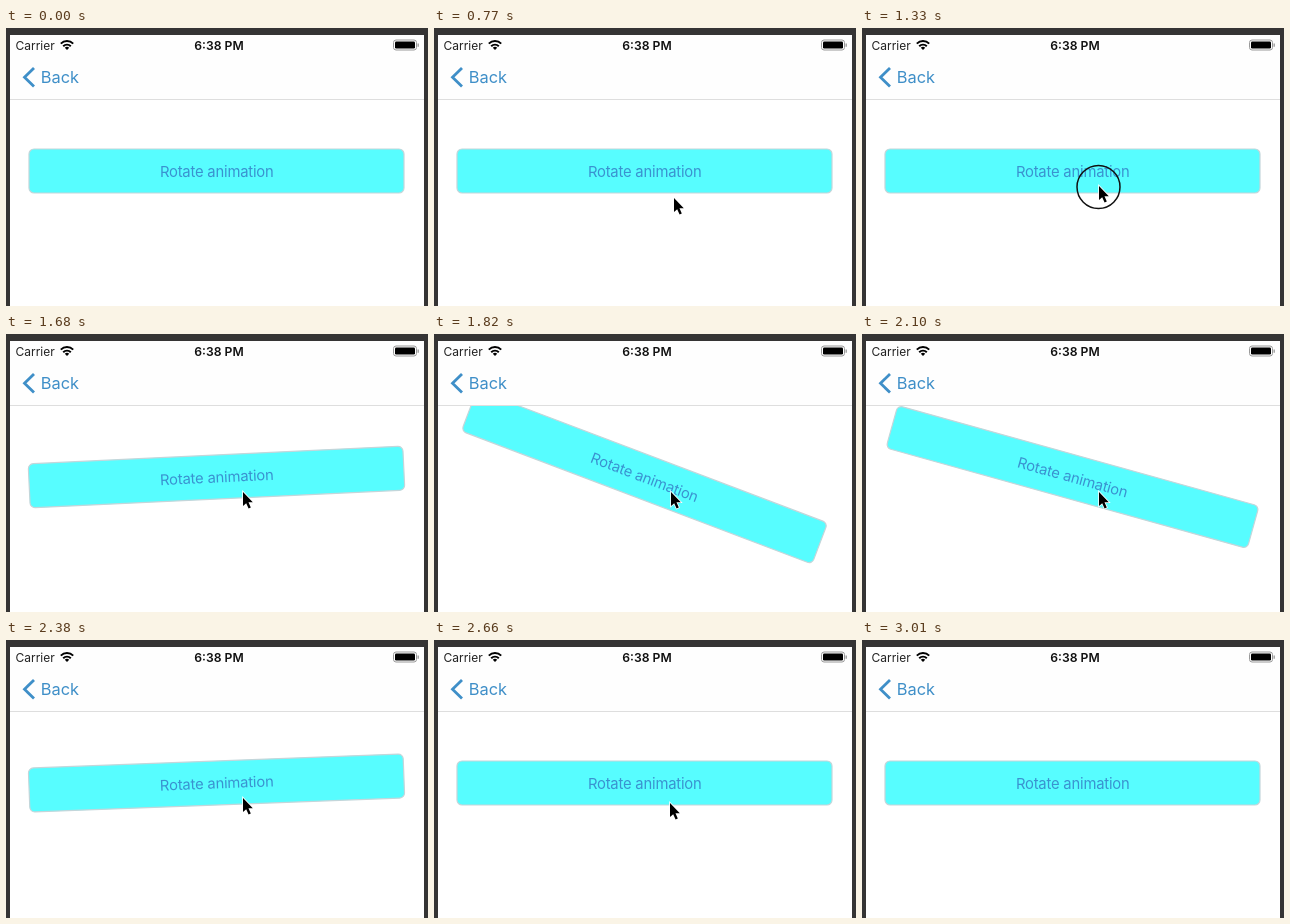
Write an HTML page that moves like this. It is 422 px wide and 278 px high and loops after 3080 ms.

```html
<!DOCTYPE html>
<html lang="en">
<head>
<meta charset="utf-8">
<title>Rotate animation</title>
<style>
  html, body { margin: 0; width: 100%; height: 100%; overflow: hidden; background: #333; }
  svg { display: block; width: 422px; height: 278px; font-family: Inter, Roboto, sans-serif; }
</style>
</head>
<body>
<svg viewBox="0 0 422 278">
  <rect width="422" height="278" fill="#353434"/>
  <rect x="4" y="7" width="414" height="271" fill="#fff"/>

  <g id="button">
    <rect x="23" y="121" width="375" height="44" rx="5" fill="#57fdff" stroke="#c3d6da" stroke-width="1.2"/>
    <text x="210.7" y="148.5" font-size="14.8" letter-spacing="-.2" text-anchor="middle" fill="#3a92d0">Rotate animation</text>
  </g>

  <rect x="4" y="7" width="414" height="64" fill="#fefefe"/>
  <path d="M4 71.5H418" stroke="#dedede"/>

  <text x="9.5" y="21.5" font-size="12" fill="#222">Carrier</text>
  <text x="213" y="21.5" font-size="12.2" font-weight="600" text-anchor="middle" fill="#111">6:38 PM</text>
  <g fill="none" stroke="#000" stroke-width="2">
    <path d="M54.8 15.6a9 9 0 0 1 12.4 0M57.2 18.3a5.5 5.5 0 0 1 7.6 0"/>
    <path d="M61 22l-2.2-2.3a3.2 3.2 0 0 1 4.4 0z" fill="#000" stroke="none"/>
  </g>
  <rect x="387.5" y="12" width="23" height="10" rx="2.5" fill="#fff" stroke="#999"/>
  <rect x="389" y="13.5" width="20" height="7" rx="1.3"/>
  <path d="M412.2 15.5v3.2" stroke="#999" stroke-width="1.3"/>

  <path d="M28 40L18.5 49.3L28 58.6" fill="none" stroke="#3f8fc8" stroke-width="2.8"/>
  <text x="34.8" y="55" font-size="16.4" fill="#3f8fc8">Back</text>

  <circle id="ring" cx="236.5" cy="159" r="21.5" fill="none" stroke="#111" stroke-width="1.5"/>
  <path id="cursor" d="M0 0V14L3.2 11.2L5.6 16.4L7.8 15.4L5.5 10.3H9.8Z" stroke="#fff" stroke-width="1.6" paint-order="stroke"/>
</svg>
<script>
const LOOP = 3080, STEP = 70;
const $ = id => document.getElementById(id);

// keys: [time, value, ...]
const angleKeys = [[1540, 0], [1645, -4], [1960, 38.2], [2230, -4.6], [2520, 0]];
const cursorKeys = [
  [280, 228, 285], [350, 231, 270], [490, 239, 228], [630, 243, 189], [770, 240, 170],
  [840, 239, 169], [980, 237, 164], [1050, 237, 164], [1190, 237, 158],
  [2590, 237, 158], [2660, 236, 163], [2800, 232, 196], [2940, 222, 258], [3010, 219, 290]
];
const ringKeys = [[1120, 0], [1260, 1], [1400, 1], [1540, 0]];

const linear = p => p;
const smooth = p => (1 - Math.cos(Math.PI * p)) / 2;

function sample(keys, t, ease) {
  const i = keys.findIndex(k => k[0] > t);
  if (i < 1) return keys.at(i).slice(1);
  const a = keys[i - 1], b = keys[i];
  const p = ease((t - a[0]) / (b[0] - a[0]));
  return a.slice(1).map((v, n) => v + (b[n + 1] - v) * p);
}

function draw(now) {
  const t = Math.floor(now % LOOP / STEP) * STEP;
  $("button").setAttribute("transform", `rotate(${sample(angleKeys, t, smooth)} 210.5 143)`);
  $("cursor").setAttribute("transform", `translate(${sample(cursorKeys, t, linear)})`);
  $("ring").setAttribute("opacity", sample(ringKeys, t, linear));
}

const start = performance.now();
function tick() {
  draw(performance.now() - start);
  requestAnimationFrame(tick);
}
tick();
</script>
</body>
</html>
```
